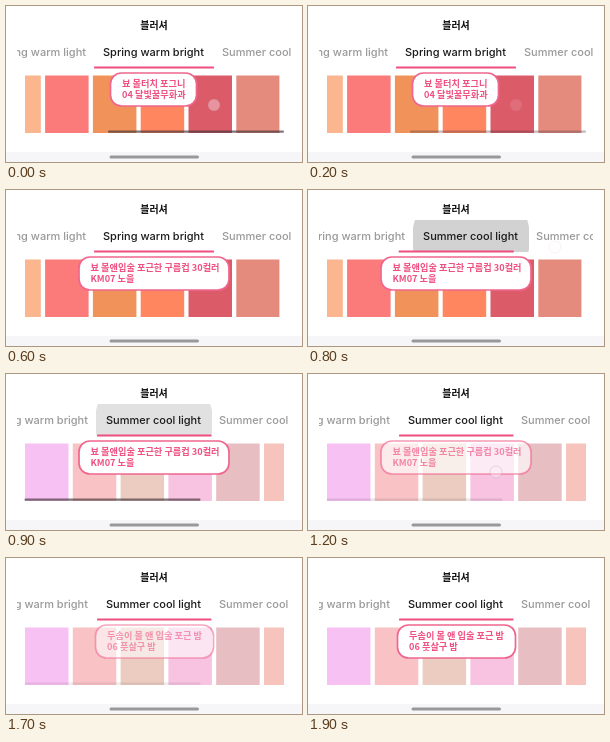
Animation of 296 by 156 pixels, one loop 2 s. Source, as an HTML page with a canvas:

```html
<!DOCTYPE html>
<html lang="ko">
<head>
<meta charset="utf-8">
<style>
html, body { margin: 0; width: 100%; height: 100%; overflow: hidden; background: #fff; }
canvas { display: block; }
</style>
</head>
<body>
<canvas width="296" height="156"></canvas>
<script>
const g = document.querySelector('canvas').getContext('2d');
const KOREAN = '"Noto Sans CJK KR", "Noto Sans CJK", sans-serif';
const PINK = '#ef4f80';
const WARM = ['#fcb68f', '#fa7b79', '#f09259', '#ff865f', '#dc5b68', '#e48b7e'];
const COOL = ['#f7c1f4', '#f9c3c5', '#ecccc1', '#f7c3e1', '#e7bfc3', '#f6c3bd'];

const ramp = (t, from, to) => Math.min(1, Math.max(0, (t - from) / (to - from)));
const mix = (a, b, p) => a + (b - a) * p;

function text(str, x, y, font, color, align = 'left') {
  g.font = font;
  g.fillStyle = color;
  g.textAlign = align;
  g.fillText(str, x, y);
}

function pill(x, y, w, h, r, color) {
  g.fillStyle = color;
  g.beginPath();
  g.roundRect(x, y, w, h, r);
  g.fill();
}

function clipped(x, y, w, h, draw) {
  g.save();
  g.beginPath();
  g.rect(x, y, w, h);
  g.clip();
  draw();
  g.restore();
}

function faded(alpha, draw) {
  if (alpha <= 0) return;
  g.save();
  g.globalAlpha = alpha;
  draw();
  g.restore();
}

function disc(x, y, r, color) {
  g.beginPath();
  g.arc(x, y, r, 0, 7);
  g.fillStyle = color;
  g.fill();
}

// A round ripple, cut to the height of the tab.
function ripple(x, alpha) {
  clipped(x - 58, 30, 116, 32, () => disc(x, 48, 59, `rgba(0,10,5,${alpha})`));
}

function tabs(t) {
  const p = t < 700 ? 0 : t < 800 ? 0.4 : t < 900 ? 0.87 : 1;
  const scroll = 116 * p;
  const label = (str, x, active, align) =>
    text(str, x - scroll, 50, '500 11px Inter, sans-serif', active ? '#1a1a1a' : '#999', align);
  clipped(11, 0, 274, 156, () => {
    if (t >= 700) ripple(264 - scroll, t < 900 ? 0.18 : 0.12 * (1 - ramp(t, 900, 1100)));
    label('Spring warm light', 80, false, 'right');
    label('Spring warm bright', 97, p < 0.4);
    label('Summer cool light', 216, p >= 0.4);
    label('Summer cool bright', 329, false);
    const left = mix(88, 207, p) - scroll;
    const right = mix(208, 321.5, p) - scroll;
    pill(left, 60.5, right - left, 2, 0.5, PINK);
  });
}

function swatches(t) {
  const cool = t >= 900;
  const start = cool ? 19 : -8.7;
  clipped(19, 0, cool ? 259 : 254.5, 156, () => (cool ? COOL : WARM).forEach((color, i) => {
    g.fillStyle = color;
    g.fillRect(start + i * 47.8, 69.5, 43.5, 57.5);
  }));
}

function scrollbar(t) {
  const alpha = t < 900 ? 1 - ramp(t, 0, 400)
    : t < 1300 ? 1 - 0.8 * ramp(t, 900, 1200)
    : 0.45 * (1 - ramp(t, 1500, 1800));
  faded(alpha, () => pill(t < 900 ? 102 : 18.5, 124.5, 176, 2.3, 1, 'rgba(70,55,60,.68)'));
}

function touch(alpha, x, y) {
  faded(alpha, () => {
    disc(x, y, 6, 'rgba(255,240,248,.38)');
    g.strokeStyle = 'rgba(160,130,150,.3)';
    g.lineWidth = 0.8;
    g.stroke();
  });
}

function toast(alpha, x, w, lines) {
  faded(alpha, () => {
    g.beginPath();
    g.roundRect(x, 67, w, 33, 11);
    g.fillStyle = '#fff';
    g.fill();
    g.strokeStyle = '#f0668f';
    g.lineWidth = 1.7;
    g.stroke();
    lines.forEach((line, i) => text(line, x + 11.5, 81.3 + i * 10.7, `700 9.2px ${KOREAN}`, PINK));
  });
}

function draw(t) {
  g.fillStyle = '#fff';
  g.fillRect(0, 0, 296, 156);
  text('블러셔', 148, 23, `900 10px ${KOREAN}`, '#111', 'center');
  tabs(t);
  swatches(t);
  scrollbar(t);
  g.fillStyle = '#f6f6f8';
  g.fillRect(0, 146, 296, 10);
  pill(103.5, 149.5, 89.5, 3, 1.5, '#999');
  toast(1 - ramp(t, 300, 500), 104.5, 86, ['뵤 볼터치 포그니', '04 달빛꿀무화과']);
  toast(ramp(t, 200, 450) * (1 - ramp(t, 1100, 1400)), 73, 150,
    ['뵤 볼앤입술 포근한 구름컵 30컬러', 'KM07 노을']);
  toast(ramp(t, 1500, 1850), 89.5, 118, ['두솜이 볼 앤 입술 포근 밤', '06 풋살구 밤']);
  touch(1 - ramp(t, 0, 300), 208, 99);
  if (t >= 700) touch(1 - ramp(t, 700, 850), 247, 57);
  if (t >= 1200) touch(1 - ramp(t, 1200, 1400), 188, 98);
}

function loop() {
  draw(Math.floor(performance.now() % 2000 / 100) * 100);
  requestAnimationFrame(loop);
}
loop();
</script>
</body>
</html>
```
